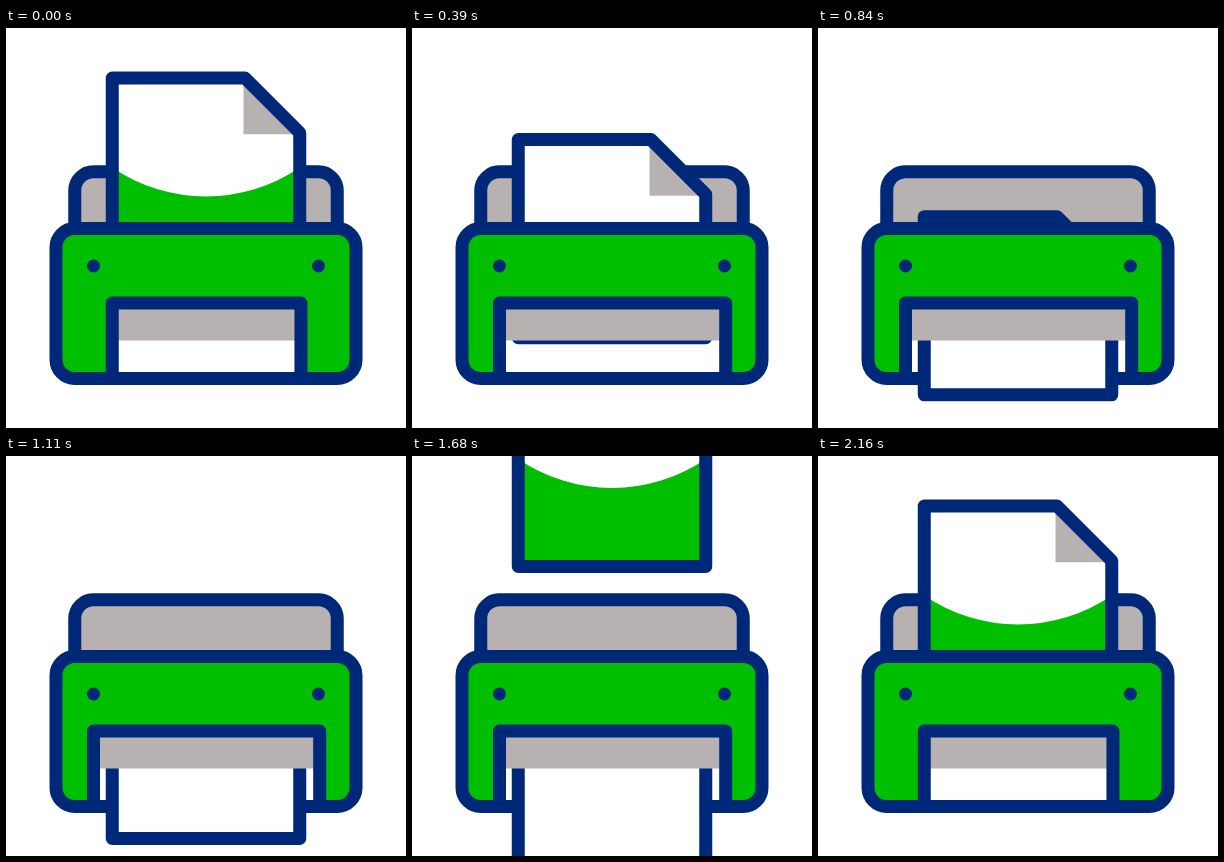
An HTML page that plays this animation: 400 px wide and 400 px high, repeating every 2.25 s.

```html
<!DOCTYPE html>
<html lang="en">
<head>
<meta charset="utf-8">
<title>Printer</title>
<style>
  html, body { margin: 0; width: 100%; height: 100%; overflow: hidden; background: #fff; }
  svg { display: block; width: 100vw; height: 100vh; }
  .line { stroke: #002878; stroke-width: 13; stroke-linejoin: round; }
  .white { fill: #fff; }
  .green { fill: #00be00; }
  .gray { fill: #b7b2b1; }
  .none { fill: none; }
  .navy { fill: #002878; }
</style>
</head>
<body>
<svg viewBox="0 0 400 400">
  <defs>
    <clipPath id="above"><rect width="400" height="200"/></clipPath>
    <clipPath id="below"><rect y="281" width="400" height="119"/></clipPath>
  </defs>

  <path class="line gray" d="M68.75 200V162.5a18.75 18.75 0 0 1 18.75-18.75h225a18.75 18.75 0 0 1 18.75 18.75V200"/>

  <g clip-path="url(#above)">
    <path id="paper" class="white"/>
    <path id="ink" class="green" d="M106.25 139.5A166 166 0 0 0 293.75 139.5V247H106.25Z"/>
    <path id="fold" class="gray" d="M237.5 50V106.25H293.75Z"/>
    <path id="edge" class="line none"/>
  </g>

  <rect class="line green" x="50" y="200.5" width="300" height="150" rx="18.75"/>
  <circle class="navy" cx="87.5" cy="238" r="6.5"/>
  <circle class="navy" cx="312.5" cy="238" r="6.5"/>

  <rect id="hole" class="white" y="275" height="69"/>
  <g clip-path="url(#below)">
    <rect id="sheet" class="line white" x="106.25" y="56" width="187.5" height="215"/>
  </g>
  <rect id="shade" class="gray" y="275" height="37.5"/>
  <path id="slot" class="line none"/>
</svg>
<script>
  const LOOP = 2250, STEP = 30, REFILL = 1240;
  const linear = t => t;
  const easeIn = t => t * t;
  const easeOut = t => 1 - (1 - t) ** 2;
  const easeBoth = t => (1 - Math.cos(Math.PI * t)) / 2;

  // Each row: time, value, easing used to reach it
  const feedY = [[105, 0], [600, 107, linear], [1110, 151, easeOut]];
  const refillY = [[1400, -258], [1830, -71.6, linear], [2160, 0, easeOut]];
  const sheetY = [
    [85, 0], [810, 92.1, linear], [1110, 111.5, easeOut],
    [REFILL, 111.5, linear],
    [1410, 137.9, easeIn], [1950, 329, linear], [2160, 369.5, easeOut]
  ];
  const slotLeft = [
    [75, 106.25], [240, 81.5, easeBoth], [390, 87.5, easeBoth],
    [1785, 87.5, linear], [1940, 81.5, easeBoth], [2160, 106.25, easeBoth]
  ];

  function valueAt(rows, time) {
    if (time <= rows[0][0]) return rows[0][1];
    for (let i = 1; i < rows.length; i++) {
      const [start, from] = rows[i - 1];
      const [end, to, ease] = rows[i];
      if (time < end) return from + (to - from) * ease((time - start) / (end - start));
    }
    return rows[rows.length - 1][1];
  }

  const byId = id => document.getElementById(id);
  const [paper, ink, fold, edge, sheet, hole, shade, slot] =
    ["paper", "ink", "fold", "edge", "sheet", "hole", "shade", "slot"].map(byId);
  const moveY = (el, y) => el.setAttribute("transform", `translate(0 ${y})`);

  // The top of a new page travels further than its printed part
  function drawPage(time) {
    const refill = time >= REFILL;
    const inkY = valueAt(refill ? refillY : feedY, time);
    const topY = refill ? inkY * 1.4 : inkY;
    const outline = `M106.25 ${50 + topY}H239L293.75 ${104.75 + topY}V${247 + inkY}H106.25Z`;
    paper.setAttribute("d", outline);
    edge.setAttribute("d", outline);
    moveY(ink, inkY);
    moveY(fold, topY);
  }

  function drawSlot(time) {
    const left = valueAt(slotLeft, time), right = 401.2 - left;
    for (const el of [hole, shade]) {
      el.setAttribute("x", left);
      el.setAttribute("width", right - left);
    }
    slot.setAttribute("d", `M${left} 350V275H${right}V350`);
  }

  function draw(time) {
    drawPage(time);
    drawSlot(time);
    moveY(sheet, valueAt(sheetY, time));
  }

  const begin = performance.now();
  function tick() {
    const time = (performance.now() - begin) % LOOP;
    draw(Math.floor(time / STEP) * STEP);
    requestAnimationFrame(tick);
  }
  tick();
</script>
</body>
</html>
```
